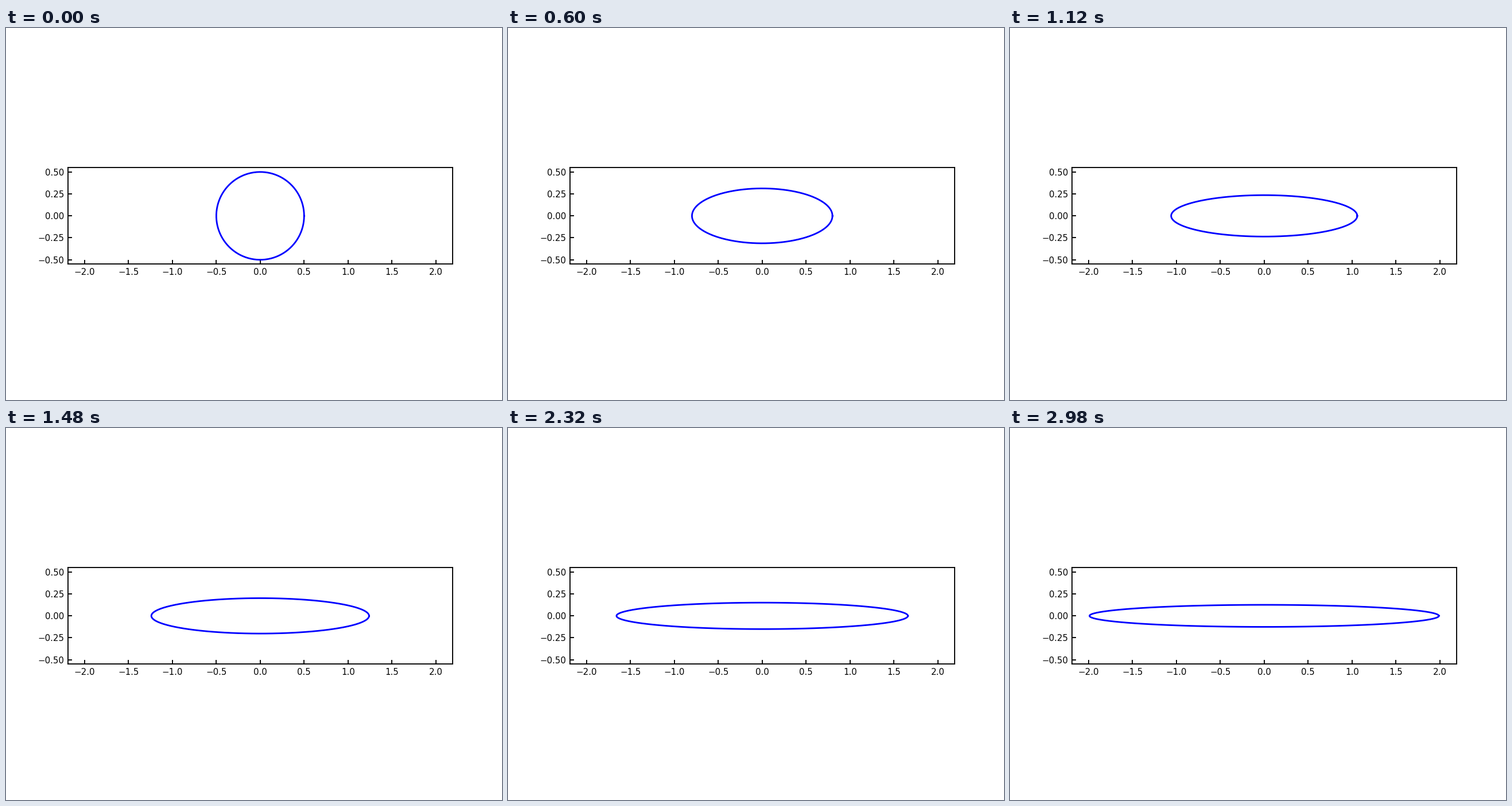
Write a matplotlib script that moves like this. It is 864 by 648 pixels and loops after 3000 ms.

```python
import numpy as np
import matplotlib.pyplot as plt
from matplotlib.animation import FuncAnimation

FRAMES = 150
INTERVAL = 20
AREA = 0.25  # product of the semi-axes stays constant

plt.rcParams.update({
    "font.family": "DejaVu Sans",
    "font.size": 8,
    "axes.linewidth": 1,
    "lines.linewidth": 1.5,
})
for axis in ("xtick", "ytick"):
    plt.rcParams.update({
        f"{axis}.direction": "in",
        f"{axis}.major.size": 3.5,
        f"{axis}.major.width": 1,
        f"{axis}.major.pad": 3.5,
        f"{axis}.labelsize": 8,
    })

theta = np.linspace(0, 2 * np.pi, 100)


def semi_axes(i):
    a = 0.5 + 0.01 * i
    return a, AREA / a


fig, ax = plt.subplots(figsize=(6.4, 4.8), dpi=135)
ax.set_aspect("equal")
x_max = 1.1 * semi_axes(FRAMES - 1)[0]
y_max = 1.1 * semi_axes(0)[1]
ax.set_xlim(-x_max, x_max)
ax.set_ylim(-y_max, y_max)
ax.set_xticks(np.arange(-2, 2.1, 0.5))
ax.set_yticks(np.arange(-0.5, 0.6, 0.25))

curve, = ax.plot([], [], color="blue")


def update(i):
    a, b = semi_axes(i)
    curve.set_data(a * np.cos(theta), b * np.sin(theta))
    return curve,


anim = FuncAnimation(fig, update, frames=FRAMES, interval=INTERVAL,
                     repeat=True, repeat_delay=0)
plt.show()
```
